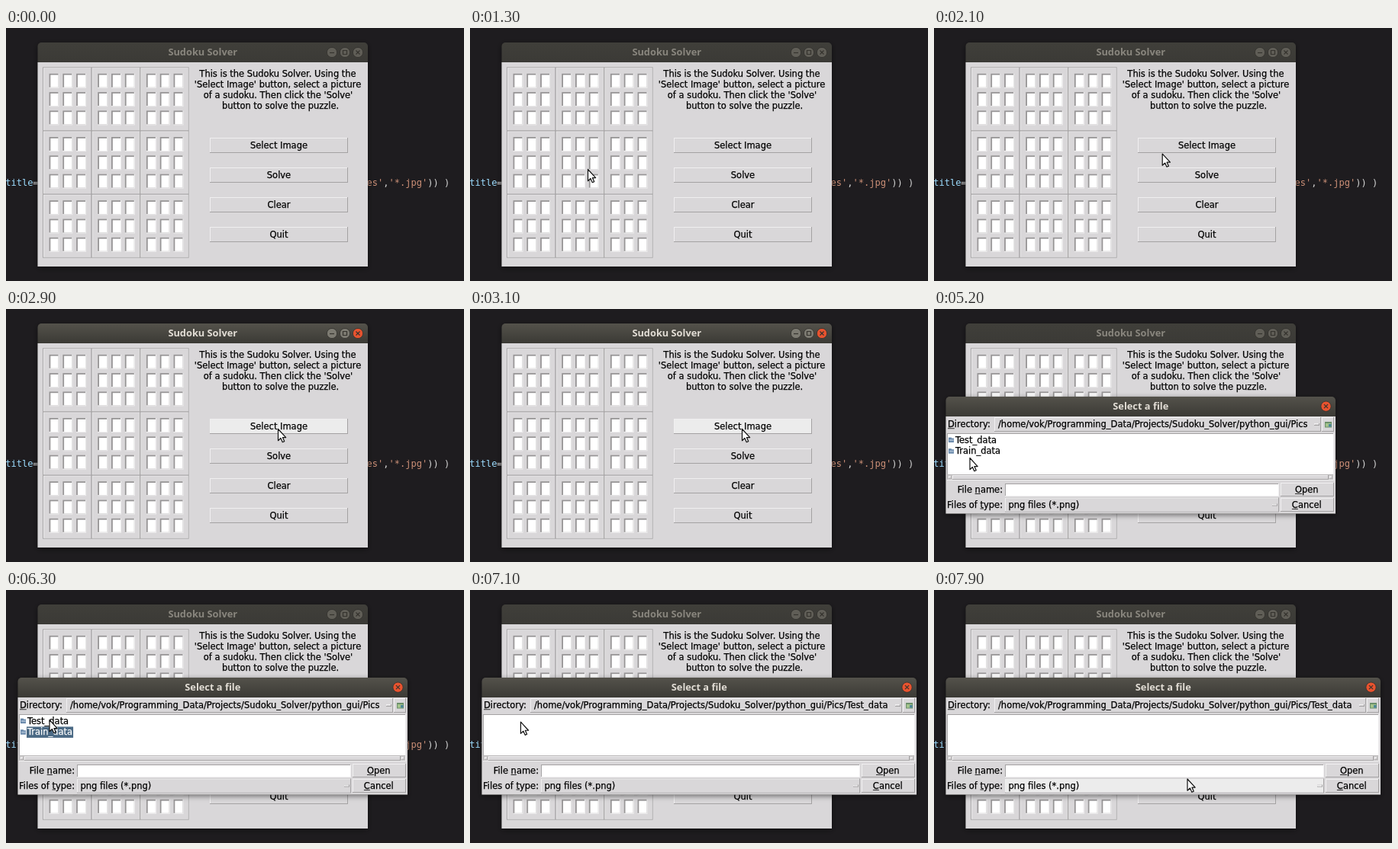
An HTML page with a canvas that plays this animation: 600x332 px, repeating every 8000 ms.

```html
<!DOCTYPE html>
<html lang="en">
<head>
<meta charset="utf-8">
<title>Sudoku Solver</title>
<style>
html, body { margin: 0; width: 100%; height: 100%; overflow: hidden; background: #1e1c1f; }
canvas { display: block; }
</style>
</head>
<body>
<canvas id="stage" width="600" height="332"></canvas>
<script>
const ctx = document.getElementById('stage').getContext('2d');
const LOOP = 8000, STEP = 100;
const SANS = '11.47px "DejaVu Sans", sans-serif';
const BOLD = 'bold 12.8px "Noto Sans", "Open Sans", sans-serif';
const MONO = '12.05px "DejaVu Sans Mono", monospace';
const FACE = '#d9d7d9', HOVER = '#ececec', LIGHT = '#f0eff0', SHADE = '#a4a2a3', INK = '#000';
const HOME = '/home/vok/Programming_Data/Projects/Sudoku_Solver/python_gui';

// Cursor stops: time, x, y
const PATH = [
  [300, 108, 214], [900, 150, 190], [1300, 154.5, 185.5], [1800, 262, 170],
  [2500, 356.5, 157.5], [4000, 250, 178], [4500, 44, 197], [5200, 47, 195.5],
  [5300, 49, 183], [5400, 50, 182.5], [5800, 50, 182.5], [6300, 57, 170.5],
  [7000, 57, 170.5], [7900, 332, 248]
];

function rect(x, y, w, h, color) {
  ctx.fillStyle = color;
  ctx.fillRect(x, y, w, h);
}

function text(str, x, y, color = INK, font = SANS, align = 'left') {
  ctx.font = font;
  ctx.textAlign = align;
  ctx.fillStyle = ctx.strokeStyle = color;
  ctx.fillText(str, x, y);
  if (font === SANS) {
    ctx.lineWidth = .25;
    ctx.strokeText(str, x, y);
  }
}

// Box with light and dark edges; swap the edge colours to sink it
function bevel(x, y, w, h, fill = FACE, hi = LIGHT, lo = SHADE) {
  rect(x, y, w, h, lo);
  rect(x, y, w - 1, h - 1, hi);
  rect(x + 1, y + 1, w - 2, h - 2, fill);
}

// Text with one underlined letter
function label(str, key, x, y, align = 'left') {
  ctx.font = SANS;
  const width = s => ctx.measureText(s).width;
  if (align === 'center') x -= width(str) / 2;
  if (align === 'right') x -= width(str);
  text(str, x, y);
  rect(x + width(str.slice(0, key)), y + 1, width(str[key]), .8, INK);
}

function circleButton(x, y, kind, active) {
  const close = kind === 'close';
  ctx.beginPath();
  ctx.arc(x, y, 6.6, 0, 7);
  ctx.fillStyle = !active ? '#605e57' : close ? '#e8532f' : '#7d7b72';
  ctx.fill();
  ctx.strokeStyle = '#33322e';
  ctx.lineWidth = .8;
  ctx.stroke();
  ctx.beginPath();
  if (kind === 'min') {
    ctx.moveTo(x - 3, y + .5);
    ctx.lineTo(x + 3, y + .5);
  } else if (kind === 'max') {
    ctx.rect(x - 2.5, y - 2.5, 5, 5);
  } else {
    ctx.moveTo(x - 2.5, y - 2.5); ctx.lineTo(x + 2.5, y + 2.5);
    ctx.moveTo(x + 2.5, y - 2.5); ctx.lineTo(x - 2.5, y + 2.5);
  }
  ctx.strokeStyle = '#35332e';
  ctx.lineWidth = 1.2;
  ctx.stroke();
}

function frame(x, y, w, h, title, active) {
  const g = ctx.createLinearGradient(0, y, 0, y + 26);
  g.addColorStop(0, active ? '#54524b' : '#403f3a');
  g.addColorStop(1, active ? '#3b3a35' : '#3b3a36');
  ctx.save();
  ctx.shadowColor = 'rgba(0, 0, 0, .5)';
  ctx.shadowBlur = 7;
  ctx.shadowOffsetY = 2;
  ctx.beginPath();
  ctx.roundRect(x, y, w, h, [5, 5, 0, 0]);
  ctx.fillStyle = g;
  ctx.fill();
  ctx.restore();
  rect(x, y + 26, w, h - 26, FACE);
  text(title, x + w / 2, y + 17, active ? '#e2ddd5' : '#89867e', BOLD, 'center');
}

function code() {
  text('title', -.8, 206.5, '#9cdcfe', MONO);
  text('=', 35.3, 206.5, '#d4d4d4', MONO);
  const runs = [["es'", '#ce9178'], [',', '#d4d4d4'], ["'*.jpg'", '#ce9178'], [')) )', '#d4d4d4']];
  let x = 472.5;
  for (const [str, color] of runs) {
    text(str, x, 206.5, color, MONO);
    x += ctx.measureText(str).width;
  }
}

function block(x, y) {
  ctx.lineWidth = 1;
  ctx.strokeStyle = LIGHT;
  ctx.strokeRect(x + 1.2, y + 1.2, 62.4, 82);
  ctx.strokeStyle = '#a9a7a8';
  ctx.strokeRect(x + .5, y + .5, 63.3, 83);
  for (let i = 0; i < 9; i++) {
    const cx = x + 8.5 + i % 3 * 17.8, cy = y + 8.5 + (i / 3 | 0) * 24.3;
    rect(cx, cy, 13, 19, LIGHT);
    rect(cx, cy, 12, 18, '#969495');
    rect(cx + 1.8, cy + 1.8, 10.2, 16.2, '#fff');
  }
}

function mainWindow(active, hover) {
  frame(41.5, 19, 432.5, 294, 'Sudoku Solver', active);
  ['min', 'max', 'close'].forEach((kind, i) => circleButton(427 + 17 * i, 32, kind, active));
  for (let i = 0; i < 9; i++) block(48 + i % 3 * 63.7, 51.3 + (i / 3 | 0) * 83.2);
  [
    ['This is the Sudoku Solver. Using the', 356],
    ["'Select Image' button, select a picture", 356],
    ["of a sudoku. Then click the 'Solve'", 356.5],
    ['button to solve the puzzle.', 359.5]
  ].forEach(([line, x], i) => text(line, x, 64 + 13.9 * i, INK, SANS, 'center'));
  ['Select Image', 'Solve', 'Clear', 'Quit'].forEach((name, i) => {
    const y = 144 + 39 * i;
    bevel(267, y, 181, 20, hover && !i ? HOVER : FACE);
    text(name, 357.5, y + 14, INK, SANS, 'center');
  });
}

function folder(x, y) {
  rect(x, y, 4, 2, '#6a89ab');
  rect(x, y + 1, 7, 5.5, '#6a89ab');
  rect(x + 1, y + 2.5, 5.5, 2, '#a3b8cf');
}

function menuBox(x, y, right, h, str, tx, fill) {
  bevel(x, y, right - x, h, fill);
  text(str, tx, y + 13.4);
  bevel(right - 9, y + 8, 7, 3, fill);
}

function dialog(right, dir, files, selected, hover) {
  frame(15.5, 115, right - 15.5, 153.5, 'Select a file', true);
  circleButton(right - 12.5, 127.7, 'close', true);

  label('Directory:', 0, 18, 155.4);
  menuBox(79, 142, right - 19, 19, dir, 84);
  bevel(right - 18, 142, 16, 19);
  rect(right - 14, 148, 9, 7.5, '#6b8f6a');
  rect(right - 13, 150, 7, 4.5, '#a4c48c');
  rect(right - 9, 151, 3.5, 3.5, '#4d8799');

  bevel(17, 163, right - 19, 55, '#fff', SHADE, LIGHT);
  files.forEach((name, i) => {
    const y = 175.6 + 14.6 * i, on = name === selected;
    folder(19, y - 7);
    ctx.font = SANS;
    if (on) rect(27, y - 10.8, ctx.measureText(name).width + 2, 14.5, '#4a6984');
    text(name, 28, y, on ? '#fff' : INK);
  });
  bevel(17, 217, right - 19, 8, '#cbc9ca', '#b5b3b4', LIGHT);
  bevel(24, 218, right - 33, 6);
  for (const x of [19, right - 8]) bevel(x, 219, 4, 4, FACE, LIGHT, '#b5b3b4');

  label('File name:', 5, 90, 241, 'right');
  bevel(93, 229, right - 167, 17, '#fff', SHADE, LIGHT);
  label('Files of type:', 9, 90, 260.6, 'right');
  menuBox(93, 247.5, right - 74, 19, 'png files (*.png)', 97.5, hover ? HOVER : FACE);
  [['Open', 228], ['Cancel', 248]].forEach(([name, y]) => {
    bevel(right - 72, y, 70, 18);
    label(name, 0, right - 37.7, y + 13, 'center');
  });
}

function cursor(t) {
  if (t < 300 || t >= 3300 && t < 4000) return;
  let i = PATH.findIndex(p => p[0] > t);
  if (i < 0) i = PATH.length;
  const a = PATH[i - 1], b = PATH[i] || a;
  // The pointer rests on the button until the dialog opens
  const k = a === b || a[0] === 2500 ? 0 : (t - a[0]) / (b[0] - a[0]);
  const e = k * k * (3 - 2 * k);
  ctx.save();
  ctx.translate(a[1] + (b[1] - a[1]) * e, a[2] + (b[2] - a[2]) * e);
  ctx.lineWidth = 1.2;
  ctx.lineJoin = 'round';
  ctx.strokeStyle = '#111';
  ctx.fillStyle = '#fff';
  const arrow = new Path2D('M0 0V15.2L3.4 12 5.8 17.2 8.2 16.1 5.9 11.1H10.2Z');
  ctx.fill(arrow);
  ctx.stroke(arrow);
  ctx.restore();
}

function draw(t) {
  rect(0, 0, 600, 332, '#1e1c1f');
  code();
  mainWindow(t >= 2700 && t < 3300, t >= 2300 && t < 3300);
  if (t >= 6700) {
    dialog(585, HOME + '/Pics/Test_data', [], '', t >= 7900);
  } else if (t >= 4800) {
    const picked = t >= 6500 ? 'Test_data' : t >= 5800 ? 'Train_data' : '';
    dialog(526, HOME + '/Pics', ['Test_data', 'Train_data'], picked);
  } else if (t >= 3300) {
    dialog(499, HOME, ['__pycache__', 'Data', 'Pics'], t >= 4600 ? 'Pics' : '');
  }
  cursor(t);
}

function tick() {
  draw(Math.floor(performance.now() % LOOP / STEP) * STEP);
  requestAnimationFrame(tick);
}
tick();
</script>
</body>
</html>
```
